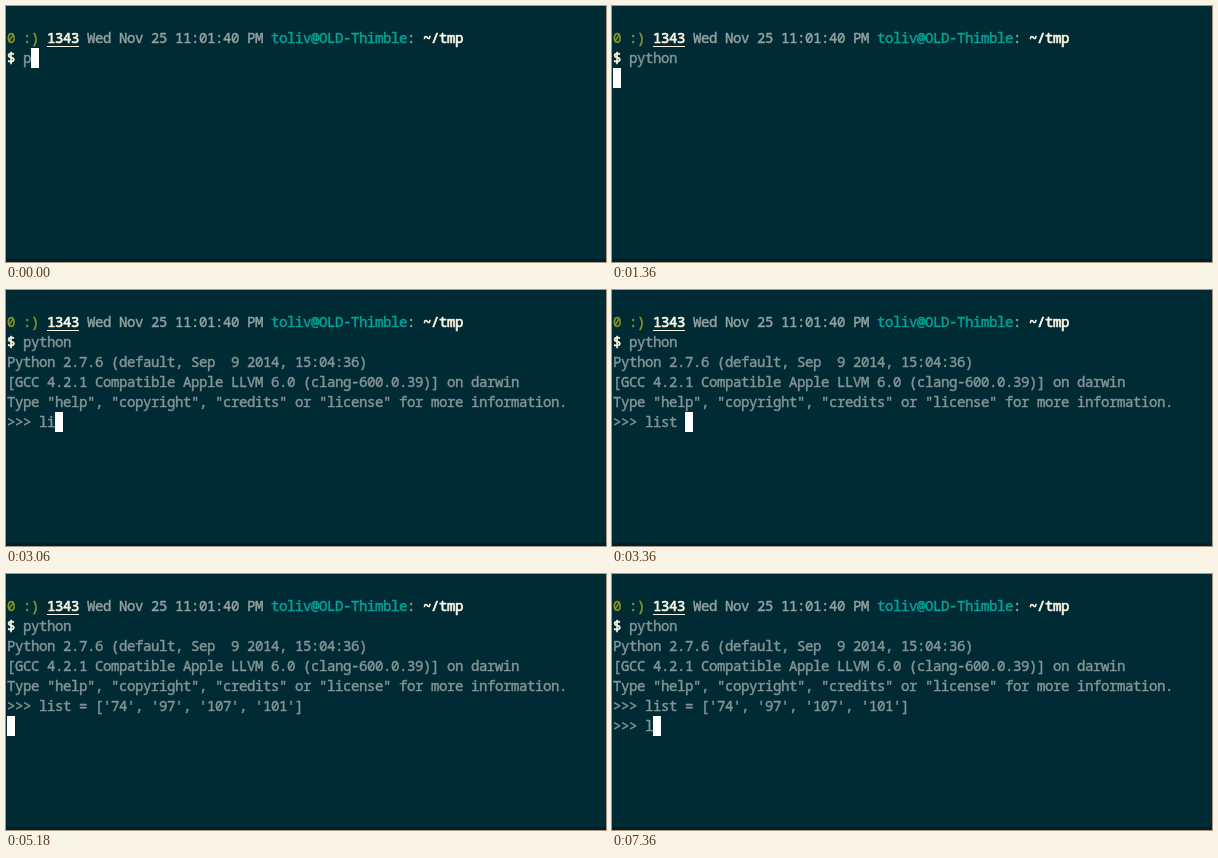
An HTML page with a canvas that plays this animation: 600x256 px, repeating every 8000 ms.

```html
<!DOCTYPE html>
<html lang="en">
<head>
<meta charset="utf-8">
<title>Terminal session</title>
<style>
  html, body { margin: 0; width: 100%; height: 100%; overflow: hidden; background: #002b35; }
  canvas { display: block; }
</style>
</head>
<body>
<canvas id="stage" width="600" height="256"></canvas>
<script>
const ctx = document.getElementById('stage').getContext('2d');
const LOOP = 8000, CELL = 8, LINE = 20, LEFT = 1, TOP = 22;
const GRAY = '#839496', LIGHT = '#93a1a1', CREAM = '#fdf6e3', GREEN = '#8a9a1a', CYAN = '#00a497';

const banner = `Python 2.7.6 (default, Sep  9 2014, 15:04:36)
[GCC 4.2.1 Compatible Apple LLVM 6.0 (clang-600.0.39)] on darwin
Type "help", "copyright", "credits" or "license" for more information.
`;

// [time, text appended to the terminal]
const output = [
  [0, 'p'], [720, 'y'], [860, 't'], [1040, 'h'], [1140, 'o'], [1260, 'n'], [1360, '\n'],
  [2090, banner], [2120, '>>> '], [2220, 'l'],
  [3060, 'i'], [3130, 's'], [3270, 't'], [3360, ' '], [3850, '='], [4310, ' '], [4410, '['],
  [4880, "'"], [4980, '7'], [5080, '4'], [5180, "', '97', '107', '101']\n"],
  [7260, '>>> '], [7360, 'l']
];

// A thin outline gives the text its heavy screen smoothing.
function write(text, col, row, color, outline = 0.45) {
  const x = LEFT + col * CELL, y = TOP + row * LINE + 15;
  ctx.font = '14px "Noto Sans Mono", monospace';
  ctx.letterSpacing = '-0.4px';
  ctx.lineJoin = 'round';
  ctx.lineWidth = outline;
  ctx.fillStyle = ctx.strokeStyle = color;
  ctx.fillText(text, x, y);
  ctx.strokeText(text, x, y);
}

function rect(x, y, w, h, color) {
  ctx.fillStyle = color;
  ctx.fillRect(x, y, w, h);
}

function draw(time) {
  rect(0, 0, 600, 256, '#002b35');
  rect(0, 253, 600, 3, '#001f28');

  write('0 :)', 0, 0, GREEN);
  write('1343', 5, 0, CREAM, 0.7);
  rect(41, 40, 32, 1, CREAM);
  write('Wed Nov 25 11:01:40 PM', 10, 0, LIGHT);
  write('toliv@OLD-Thimble', 33, 0, CYAN);
  write(':', 50, 0, LIGHT);
  write('~/tmp', 52, 0, CREAM, 0.7);
  write('$', 0, 1, CREAM, 0.7);

  const shown = output.filter(([at]) => at <= time).map(([, text]) => text).join('');
  const lines = ('  ' + shown).split('\n');
  lines.forEach((line, i) => write(line, 0, i + 1, GRAY));
  rect(LEFT + lines.at(-1).length * CELL, TOP + lines.length * LINE, CELL, LINE, '#fff');
}

function tick() {
  draw(performance.now() % LOOP);
  requestAnimationFrame(tick);
}
tick();
</script>
</body>
</html>
```
